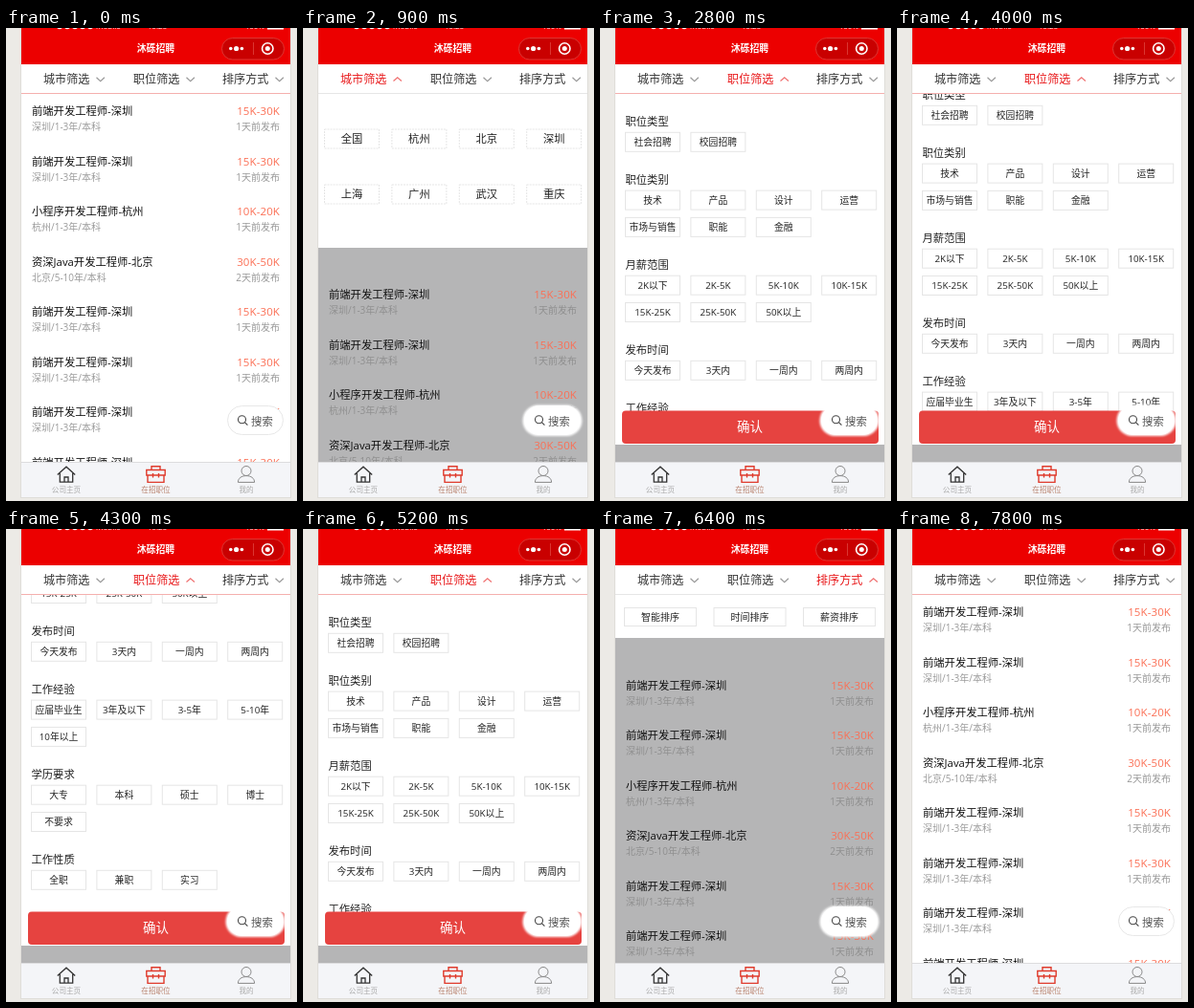
Write an HTML page that moves like this. It is 304x495 px and loops after 9000 ms.

```html
<!DOCTYPE html>
<html lang="zh-CN">
<head>
<meta charset="utf-8">
<title>招聘</title>
<style>
html, body { margin: 0; width: 100%; height: 100%; overflow: hidden; background: #eceae6; }
svg { display: block; width: 304px; height: 495px; font-family: "Open Sans", "Noto Sans CJK SC", "Noto Sans CJK", sans-serif; }
</style>
</head>
<body>
<svg id="stage" viewBox="0 0 304 495" xmlns="http://www.w3.org/2000/svg"></svg>
<script>
const LOOP = 9000;
const stage = document.getElementById('stage');

// [start time, open panel, scroll offset]
const timeline = [
  [0, 'none', 0], [900, 'city', 0], [2000, 'none', 0], [2800, 'job', 0],
  [4000, 'job', 28], [4100, 'job', 136], [4200, 'job', 205], [4300, 'job', 230],
  [5100, 'job', 120], [5200, 'job', 0], [5800, 'none', 0],
  [6400, 'sort', 0], [7800, 'none', 0]
];

function add(parent, tag, attrs, content) {
  const node = document.createElementNS('http://www.w3.org/2000/svg', tag);
  for (const key in attrs) node.setAttribute(key, attrs[key]);
  if (content !== undefined) node.textContent = content;
  parent.appendChild(node);
  return node;
}
const rect = (p, x, y, width, height, fill, more) =>
  add(p, 'rect', { x, y, width, height, fill, ...more });
const path = (p, d, stroke, width = 1, more) =>
  add(p, 'path', { d, fill: 'none', stroke, 'stroke-width': width, ...more });
const group = (p, attrs) => add(p, 'g', attrs || {});

// y is the visual middle of the line
const text = (p, str, x, y, size, fill, anchor = 'start', more) =>
  add(p, 'text', { x, y: y + size * 0.37, 'font-size': size, fill, 'text-anchor': anchor, ...more }, str);

function clip(id, x, y, width, height) {
  const c = add(stage, 'clipPath', { id });
  rect(c, x, y, width, height, '#000');
  return `url(#${id})`;
}

function option(p, label, x, y, w, h, size, more) {
  rect(p, x + 0.5, y - h / 2, w - 1, h, '#fff', { stroke: '#e5e5e5', ...more });
  text(p, label, x + w / 2, y, size, '#222', 'middle');
}

const bodyClip = clip('body', 16, 69, 281, 385);
const panelClip = clip('panel', 16, 69, 281, 332);
const blur = add(stage, 'filter', { id: 'soft', x: '-20%', y: '-30%', width: '140%', height: '160%' });
add(blur, 'feGaussianBlur', { stdDeviation: 1.2 });

// phone body
rect(stage, 15, 0, 283, 492, '#dfddd9');
rect(stage, 16, 0, 281, 491, '#fff');

// job list
const listBox = group(stage, { 'clip-path': bodyClip });
const listBack = rect(listBox, 16, 69, 281, 385, '#fff');
const list = group(listBox);
const engineer = ['前端开发工程师-深圳', '深圳/1-3年/本科', '15K-30K', '1天前发布'];
const jobs = [
  engineer, engineer,
  ['小程序开发工程师-杭州', '杭州/1-3年/本科', '10K-20K', '1天前发布'],
  ['资深Java开发工程师-北京', '北京/5-10年/本科', '30K-50K', '2天前发布'],
  engineer, engineer, engineer, engineer
];
const dim = group(list);
jobs.forEach(([title, info, pay, age], i) => {
  const y = 87 + i * 52.5;
  text(list, title, 27, y, 11.3, '#111');
  text(list, pay, 286, y, 11.5, '#fb6f55', 'end', { 'letter-spacing': 0.1 });
  text(dim, info, 27, y + 16.3, 10, 'inherit');
  text(dim, age, 286, y + 16.3, 10, 'inherit', 'end');
});
dim.querySelectorAll('text').forEach(t => t.removeAttribute('fill'));

// panels
const panels = { city: group(stage), job: group(stage), sort: group(stage) };

rect(panels.city, 16, 69, 281, 161, '#fff');
['全国', '杭州', '北京', '深圳', '上海', '广州', '武汉', '重庆'].forEach((name, i) =>
  option(panels.city, name, 22 + (i % 4) * 70.4, i < 4 ? 116 : 174, 58, 20, 11.3, { 'stroke-dasharray': '2 1' }));

rect(panels.sort, 16, 69, 281, 45, '#fff');
['智能排序', '时间排序', '薪资排序'].forEach((name, i) =>
  option(panels.sort, name, 25 + i * 93.5, 92, 76, 19, 10));

rect(panels.job, 16, 69, 281, 367, '#fff');
const filters = group(group(panels.job, { 'clip-path': panelClip }));
const sections = [
  ['职位类型', '社会招聘 校园招聘'],
  ['职位类别', '技术 产品 设计 运营 市场与销售 职能 金融'],
  ['月薪范围', '2K以下 2K-5K 5K-10K 10K-15K 15K-25K 25K-50K 50K以上'],
  ['发布时间', '今天发布 3天内 一周内 两周内'],
  ['工作经验', '应届毕业生 3年及以下 3-5年 5-10年 10年以上'],
  ['学历要求', '大专 本科 硕士 博士 不要求'],
  ['工作性质', '全职 兼职 实习']
];
let top_ = 98;
for (const [head, names] of sections) {
  const items = names.split(' ');
  text(filters, head, 26.5, top_, 11.3, '#222');
  items.forEach((name, i) =>
    option(filters, name, 26 + (i % 4) * 68.4, top_ + 21.3 + Math.floor(i / 4) * 28.3, 58, 20, 9.8));
  top_ += 60.8 + (Math.ceil(items.length / 4) - 1) * 28.3;
}
rect(panels.job, 23, 400.5, 268, 34.5, '#e64340', { rx: 4 });
text(panels.job, '确认', 156.5, 417.5, 13.5, '#fff', 'middle');

// header
rect(stage, 16, 0, 281, 38, '#ec0000');
text(stage, '●●●●● mobile', 52, -1.5, 8, '#fff');
text(stage, '16:25', 158, -1.5, 8, '#fff', 'middle');
text(stage, '100%', 270, -1.5, 8, '#fff', 'end');
rect(stage, 273, 0, 17, 1.5, '#fff');
text(stage, '沐砾招聘', 156.5, 21.3, 9.9, '#fff', 'middle', { 'font-weight': 600 });
rect(stage, 225.5, 10.5, 65, 22.5, '#c90000', { rx: 11.2, stroke: '#e0453f', 'stroke-width': 0.8 });
[[234.8, 1.8], [240.6, 2.6], [246.4, 1.8]].forEach(([cx, r]) =>
  add(stage, 'circle', { cx, cy: 21.5, r, fill: '#fff' }));
path(stage, 'M258.5 15v13', '#e0453f', 0.8);
add(stage, 'circle', { cx: 273.3, cy: 21.5, r: 5.7, fill: 'none', stroke: '#fff', 'stroke-width': 1.6 });
add(stage, 'circle', { cx: 273.3, cy: 21.5, r: 2.5, fill: '#fff' });

// filter tabs
rect(stage, 16, 38, 281, 30, '#fff');
const rule = rect(stage, 16, 68, 281, 1, '#f5b0ae');
const tabs = [['city', '城市筛选', 39], ['job', '职位筛选', 133], ['sort', '排序方式', 226]].map(([id, label, x]) => ({
  id, x,
  label: text(stage, label, x, 53.3, 12.1, '#333'),
  arrow: path(stage, '', '#999', 1.2)
}));

// search button
const glow = rect(stage, 229.5, 394.5, 62, 32.5, '#fff', { rx: 16, filter: 'url(#soft)' });
const pill = rect(stage, 231.5, 395.5, 58, 30, '#fff', { rx: 15, stroke: '#e8e8e8' });
add(stage, 'circle', { cx: 246.5, cy: 409.8, r: 4, fill: 'none', stroke: '#444', 'stroke-width': 1.1 });
path(stage, 'M249.4 412.7l3 3', '#444', 1.2);
text(stage, '搜索', 256, 411.5, 11.4, '#555');

// bottom bar
rect(stage, 16, 454, 281, 37, '#f4f5f8');
rect(stage, 16, 454, 281, 1, '#dcdcde');
path(stage, 'M53.8 467.6L63 459.2l9.2 8.4M56.3 466v9.2h13.4V466M61 475v-5h4v5', '#333', 1.3);
path(stage, 'M146.8 462.5h19.4v5.5h-19.4zM148 468v7.4h17V468M152 462.5v-3.8h9v3.8M153.5 466v4.5M159.5 466v4.5', '#df3b2c', 1.4);
path(stage, 'M242.4 475.4c0-4.2 3.6-6.8 8.6-6.8s8.6 2.6 8.6 6.8z', '#888', 1);
add(stage, 'circle', { cx: 251, cy: 463.5, r: 5, fill: '#f4f5f8', stroke: '#888' });
text(stage, '公司主页', 63, 483, 7.6, '#aaa', 'middle');
text(stage, '在招职位', 156.5, 483, 7.6, '#b8806c', 'middle');
text(stage, '我的', 251, 483, 7.6, '#aaa', 'middle');

const listShift = { none: 0, city: 192, job: 367, sort: 76.5 };

function draw(time) {
  const [, open, scroll] = timeline.filter(step => step[0] <= time).pop();
  const masked = open !== 'none';
  for (const id in panels) panels[id].setAttribute('visibility', id === open ? 'visible' : 'hidden');
  filters.setAttribute('transform', `translate(0 ${-scroll})`);
  list.setAttribute('transform', `translate(0 ${listShift[open]})`);
  list.setAttribute('visibility', open === 'job' ? 'hidden' : 'visible');
  listBack.setAttribute('fill', masked ? '#b5b5b6' : '#fff');
  dim.setAttribute('fill', masked ? '#8f8f8f' : '#999');
  rule.setAttribute('fill', open === 'city' || open === 'sort' ? '#e6e6e6' : '#f5b0ae');
  glow.setAttribute('visibility', masked ? 'visible' : 'hidden');
  pill.setAttribute('stroke', masked ? '#fff' : '#e8e8e8');
  for (const tab of tabs) {
    const on = tab.id === open;
    tab.label.setAttribute('fill', on ? '#e8181a' : '#333');
    tab.arrow.setAttribute('stroke', on ? '#f07070' : '#999');
    tab.arrow.setAttribute('d', `M${tab.x + 55.5} ${on ? 55.5 : 51.8}l4.2 ${on ? -3.8 : 3.8}l4.2 ${on ? 3.8 : -3.8}`);
  }
}

const start = performance.now();
function tick() {
  draw((performance.now() - start) % LOOP);
  requestAnimationFrame(tick);
}
tick();
</script>
</body>
</html>
```
